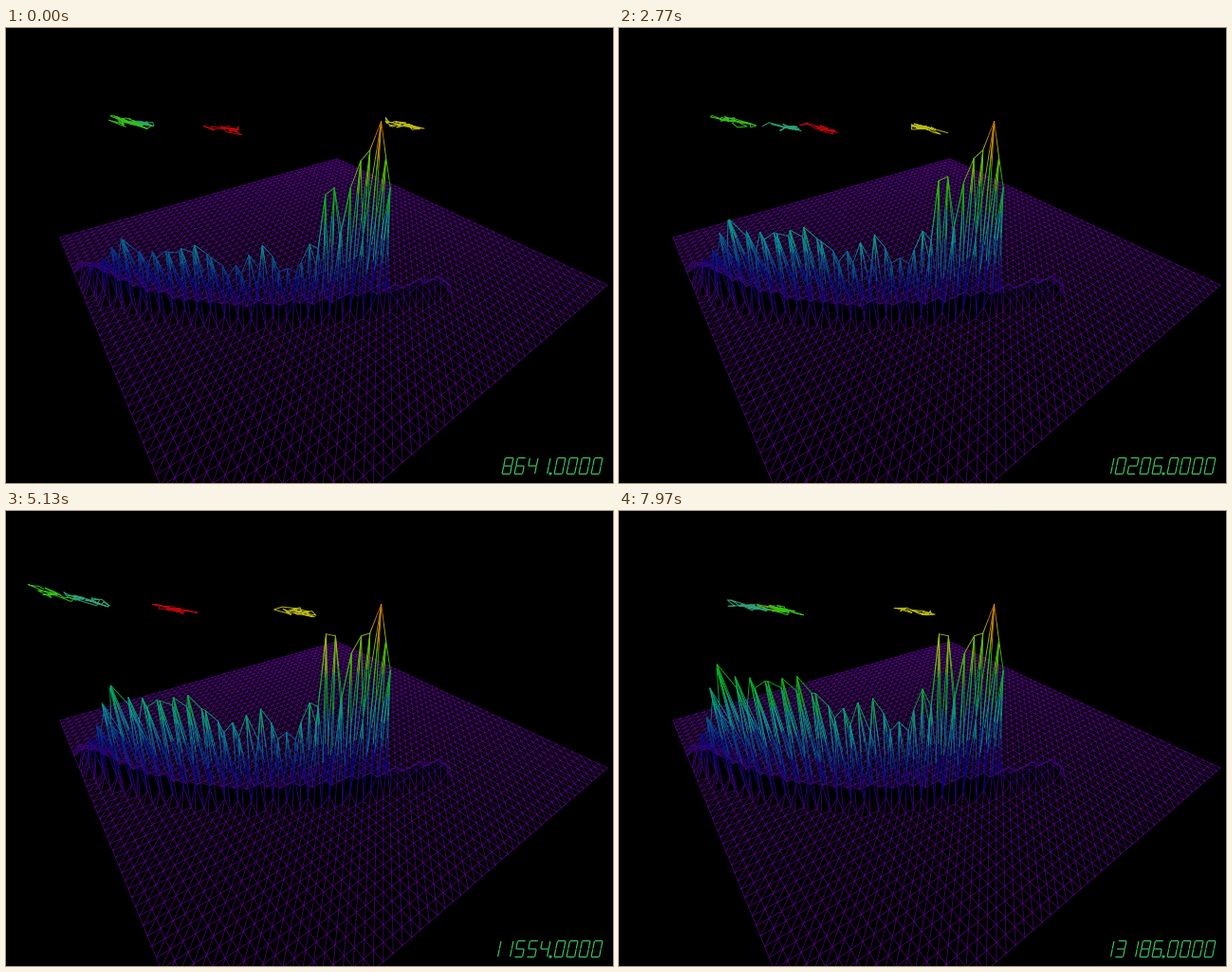
A matplotlib script that plays this animation: 640 px wide and 480 px high, repeating every 8 s.

```python
import numpy as np
import matplotlib.pyplot as plt
from matplotlib.animation import FuncAnimation
from matplotlib.collections import LineCollection
from matplotlib.colors import hsv_to_rgb

W, H, FRAMES, LOOP = 640, 480, 240, 8000
PX = 0.72  # one pixel in points at 100 dpi
KEYS = [0, 62, 102, 132, 174, 203, 239]

fig = plt.figure(figsize=(W / 100, H / 100), dpi=100, facecolor="black")
ax = fig.add_axes([0, 0, 1, 1])
ax.set_xlim(0, W)
ax.set_ylim(H, 0)
ax.axis("off")


def thin(color, width):
    line, = ax.plot([], [], color=color, lw=width * PX, snap=False)
    return line


def joined(lines):
    """Join separate polylines into one broken line."""
    gap = [[np.nan, np.nan]]
    return np.vstack([part for line in lines for part in (line, gap)])


def height_color(h):
    """Violet on the floor, through blue and green, to red at the top."""
    hue = 0.77 - 0.74 * np.clip(h / 0.366, 0, 1)
    value = np.minimum(0.42 + 1.3 * h, 0.74)
    return hsv_to_rgb(np.stack([hue, np.full_like(hue, 0.95), value], -1))


# ---- mesh in perspective, with a ridge along a curve ----
CELLS = 50
VANISH = np.array([325, 850])  # vanishing point of verticals
REACH = 1.5                    # half width of the ridge in cells
PARTS = 4                      # colour steps along an edge


def floor_point(u, v):
    w = 0.4475 * u - 0.6008 * v + 1
    return np.stack([(448.2 * u + 31.6 * v + 57) / w,
                     (-21.2 * u + 29.7 * v + 221) / w], -1)


cell = np.arange(CELLS + 1)
I, J = np.meshgrid(cell, cell, indexing="ij")
ground = floor_point(I / CELLS, J / CELLS)

q = np.linspace(0.155, 0.81, 400)
curve = np.stack([q ** 2, 0.019 + 1.43 * q - 0.62 * q ** 2], -1)
gaps = np.hypot(I[..., None] - CELLS * curve[:, 0],
                J[..., None] - CELLS * curve[:, 1])
dist = gaps.min(-1)
along = floor_point(*curve.T)[gaps.argmin(-1), 0]  # screen x on the curve

final = np.interp(
    along,
    [88, 114, 146, 160, 217, 242, 277, 295, 319, 335, 360, 373, 378, 385, 392, 397],
    [.02, .10, .24, .21, .24, .17, .20, .14, .19, .32, .265, .375, .375, .26, .255, .02])
rise = np.interp(along, [88, 114, 146, 217, 290, 335, 370],
                 [0, .04, .113, .10, .05, .085, 0])
narrow = np.exp(-(dist / 0.8) ** 4)
ridge_nodes = dist < REACH

starts, ends = [], []
for di, dj in ((1, 0), (0, 1), (1, -1)):
    a, b = I + di, J + dj
    inside = (a <= CELLS) & (b >= 0) & (b <= CELLS)
    p = (I * (CELLS + 1) + J)[inside]
    r = (a * (CELLS + 1) + b)[inside]
    live = ridge_nodes.ravel()[p] | ridge_nodes.ravel()[r]
    starts.append(p[live])
    ends.append(r[live])
starts, ends = np.concatenate(starts), np.concatenate(ends)

flat = np.where(ridge_nodes[..., None], np.nan, ground)
rows = list(flat) + list(flat.transpose(1, 0, 2))
flipped = flat[:, ::-1]
rows += [np.stack([np.diagonal(flipped[..., k], s) for k in (0, 1)], -1)
         for s in range(1 - CELLS, CELLS)]
floor = thin(height_color(np.array(0.0)), 0.85)
floor.set_data(joined(rows).T)

mesh = LineCollection([], linewidths=0.9 * PX)
ax.add_collection(mesh)


def smooth(t):
    t = np.clip(t, 0, 1)
    return t * t * (3 - 2 * t)


def ridge(n):
    grow = np.where(along < 325, n / (FRAMES - 1), smooth((n - 45) / 100))
    h = np.maximum(final - rise * (1 - grow), 0.015) * narrow
    h = np.where(ridge_nodes, np.maximum(h, 0.014), 0)
    nodes = (VANISH + (ground - VANISH) * (1 + h[..., None])).reshape(-1, 2)
    h = h.ravel()
    t = np.linspace(0, 1, PARTS + 1)[:, None]
    p, r = nodes[starts, None], nodes[ends, None]
    pts = p + (r - p) * t
    segs = np.stack([pts[:, :-1], pts[:, 1:]], 2).reshape(-1, 2, 2)
    middle = (np.arange(PARTS) + 0.5) / PARTS
    hs = h[starts, None] + (h[ends] - h[starts])[:, None] * middle
    return segs, height_color(hs.ravel())


# ---- wandering trails ----
TRAIL, HALF = 26, 25
WALKERS = {  # centre x at the key times
    "#b40808": [233, 200, 229, 182, 172, 132, 160],
    "#2ca078": [141, 113, 234, 139, 33, 120, 135],
    "#34be14": [128, 102, 135, 49, 47, 48, 170],
    "#b8b810": [416, 305, 336, 277, 338, 296, 315],
}
rng = np.random.default_rng(7)


def wander(keep):
    steps = rng.normal(size=FRAMES + TRAIL)
    for i in range(1, len(steps)):
        steps[i] += keep * steps[i - 1]
    return steps


walkers = [(thin(color, 1), xs, wander(0.6), wander(0.2))
           for color, xs in WALKERS.items()]


def trail(n, xs, sway, bob):
    centre = np.interp(n, KEYS, xs)
    dx = sway[n:n + TRAIL] - sway[n:n + TRAIL].mean()
    dx *= HALF / np.abs(dx).max()
    bend = 0.00052 if centre < 250 else 0.0002
    slope = 0.15 + 0.0012 * max(200 - centre, 0)
    y = 107 - bend * (centre - 250) ** 2 + slope * dx + 2 * bob[n:n + TRAIL]
    return centre + dx, y


# ---- seven-segment counter ----
SEGMENTS = {
    "a": (0, 0, 1, 0), "b": (1, 0, 1, .5), "c": (1, .5, 1, 1),
    "d": (0, 1, 1, 1), "e": (0, .5, 0, 1), "f": (0, 0, 0, .5),
    "g": (0, .5, 1, .5)}
DIGITS = ["abcdef", "bc", "abged", "abgcd", "fgbc", "afgcd", "afgedc",
          "abc", "abcdefg", "abcdfg"]
counter = thin("#3ccd64", 1.15)


def stroke(left, segment):
    ends = np.reshape(segment, (2, 2)) * [8.5, 17]
    trim = (ends[1] - ends[0]) / np.hypot(*(ends[1] - ends[0])) * 0.9
    pts = ends + [trim, -trim]
    pts[:, 0] += left + 3.5 * (1 - pts[:, 1] / 17)
    pts[:, 1] += 453.5
    return pts


def readout(value):
    strokes, left = [], 617
    for ch in reversed(f"{value:.4f}"):
        if ch == ".":
            strokes.append([(573, 469.5), (575, 469.5), (574.5, 471), (573, 471)])
            left -= 3
        else:
            strokes += [stroke(left, SEGMENTS[s]) for s in DIGITS[int(ch)]]
            left -= 13
    return joined(strokes)


def draw(n):
    segs, colors = ridge(n)
    mesh.set_segments(segs)
    mesh.set_color(colors)
    for line, *walk in walkers:
        line.set_data(*trail(n, *walk))
    steps = np.interp(n, KEYS, [8641, 9830, 10547, 11169, 11938, 12438, 13186])
    counter.set_data(*readout(round(steps)).T)
    return [mesh, counter]


anim = FuncAnimation(fig, draw, frames=FRAMES, interval=LOOP / FRAMES,
                     repeat=True, repeat_delay=0, blit=False)
plt.show()
```
